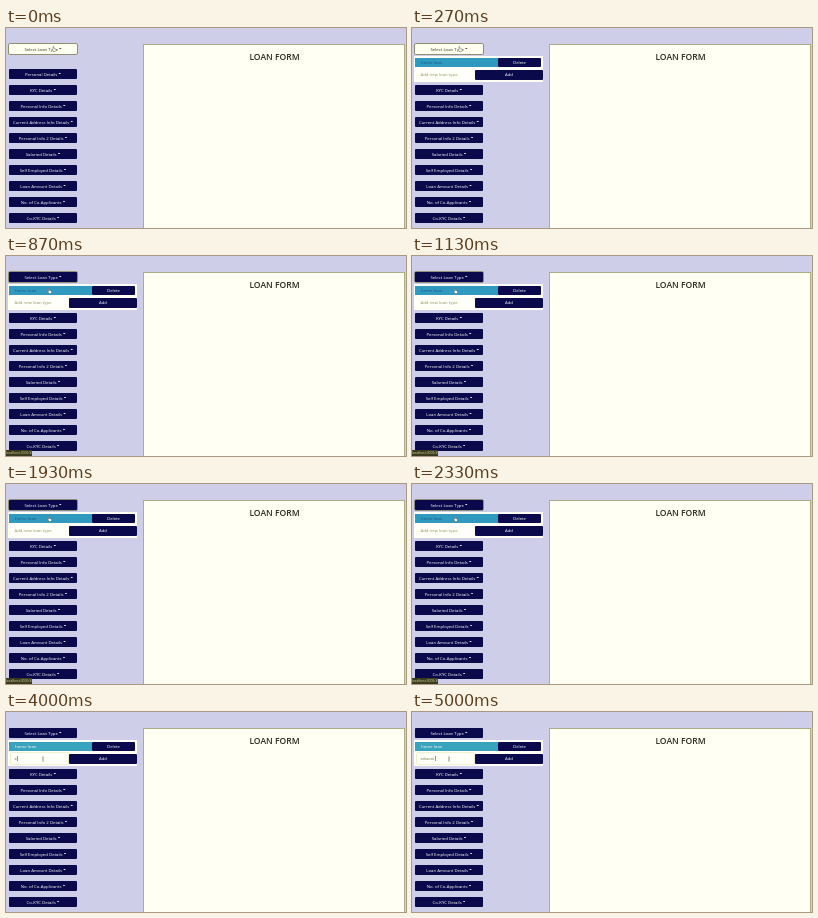
These frames come from a looping animation (400x200 px, 5.07 s). An HTML page:

```html
<!DOCTYPE html>
<html lang="en">
<head>
<meta charset="utf-8">
<title>Loan form</title>
<style>
  html, body { margin: 0; width: 100%; height: 100%; overflow: hidden; }
  body { position: relative; background: #cecee9; font: 500 4.3px "Open Sans", "Noto Sans", sans-serif; }
  #stage { position: absolute; left: 0; top: 0; width: 400px; height: 200px; overflow: hidden; }
  #stage div, #stage svg { position: absolute; box-sizing: border-box; white-space: nowrap; }
  #stage .button {
    display: flex; align-items: center; justify-content: center;
    height: 10px; padding-bottom: .8px; border-radius: 1px; background: #09094c; color: #fff;
  }
  .toggle { left: 3px; width: 68px; }
  .toggle::after {
    content: ""; width: 2.6px; height: 1.4px; margin-left: 1.1px;
    background: currentColor; clip-path: polygon(0 0, 100% 0, 50% 100%);
  }
  #panel { left: 137px; top: 16px; width: 262px; height: 184px; background: #fffff3; border: 1px solid #adad86; border-bottom: 0; }
  #title { left: 138px; top: 23px; width: 261px; text-align: center; font-size: 8.55px; line-height: 13px; font-weight: 600; color: #29291c; }
  #menu { left: 2px; top: 28px; width: 129px; height: 26px; background: #fffff5; }
  #item { left: 1px; top: 2px; width: 83px; height: 9px; padding-left: 6px; line-height: 8.4px; }
  #field { left: 3px; top: 13px; width: 57px; height: 11px; padding-left: 3.5px; line-height: 10.4px; background: #fffffa; border-radius: 1px; }
  #caret { top: 3px; width: .5px; height: 5px; background: #99996a; }
  #status { left: 0; top: 194px; width: 26px; height: 6px; line-height: 5.4px; font-size: 3.3px; background: #3c3c1c; color: #d8d8b0; }
  #beam { width: .6px; height: 5px; background: #88886a; }
</style>
</head>
<body>
<div id="stage">
  <div id="panel"></div>
  <div id="title">LOAN FORM</div>
  <div id="menu">
    <div id="item">home loan</div>
    <div class="button" style="left:84px;top:2px;width:43px;height:9px">Delete</div>
    <div id="field"><span id="value"></span><div id="caret"></div></div>
    <div class="button" style="left:61px;top:13.5px;width:68px">Add</div>
  </div>
  <div id="status">localhost:3000/#</div>
  <svg id="hand" width="5" height="6" viewBox="0 0 5 6">
    <path d="M1 .5h.8v2l2.2.5v1.5L3.4 5.6H1.6L.3 3.6l.7-.3z" fill="#fff" stroke="#44443a" stroke-width=".4"/>
  </svg>
  <div id="beam"></div>
</div>
<script>
const LOOP = 5070;
const OPEN = 200, LEAVE = 2600, FOCUS = 3270;
const KEYS = [3470, 4130, 4330, 4530, 4730, 4930];
const WORD = "educat";
const LABELS = ["Personal Details", "KYC Details", "Personal Info Details",
  "Current Address Info Details", "Personal Info 2 Details", "Salaried Details",
  "Self Employed Details", "Loan Amount Details", "No. of Co-Applicants", "Co-KYC Details"];

// Pointer path: time, x, y; it eases from each stop to the next.
const PATH = [[400, 46, 18], [530, 41.5, 32], [LEAVE, 41.5, 32],
  [2800, 8.5, 44], [3000, 8.5, 44], [FOCUS, 36.5, 44.5]];

const $ = id => document.getElementById(id);
const stage = $("stage");

function addToggle(label, top) {
  const el = document.createElement("div");
  el.className = "button toggle";
  el.textContent = label;
  el.style.top = top + "px";
  stage.insertBefore(el, $("menu"));
  return el;
}
const select = addToggle("Select Loan Type", 16);
const toggles = LABELS.map((label, i) => addToggle(label, 41 + 16 * i));

const ramp = (t, from, to) => Math.min(1, Math.max(0, (t - from) / (to - from)));
const ease = p => p * p * (3 - 2 * p);
const mix = (a, b, p) => a + (b - a) * p;
const blend = (a, b, p) => `rgb(${a.map((v, i) => Math.round(mix(v, b[i], p)))})`;
const show = (el, on) => { el.style.visibility = on ? "visible" : "hidden"; };

function pointerAt(t) {
  let [, x, y] = PATH[0];
  for (let i = 1; i < PATH.length; i++) {
    const p = ease(ramp(t, PATH[i - 1][0], PATH[i][0]));
    x = mix(x, PATH[i][1], p);
    y = mix(y, PATH[i][2], p);
  }
  return { x, y };
}

function render(t) {
  show(toggles[0], t < OPEN);
  show($("menu"), t >= OPEN);

  // The toggle fades once the pointer leaves it, and keeps a focus ring until the field is clicked.
  const fade = ramp(t, 475, 640);
  select.style.background = blend([255, 255, 240], [9, 9, 76], fade);
  select.style.color = blend([55, 55, 40], [255, 255, 255], fade);
  const ring = 1 - ramp(t, FOCUS, FOCUS + 60);
  select.style.boxShadow = `0 0 0 .8px rgba(125,125,85,${ring})`;

  const leave = ramp(t, LEAVE, LEAVE + 130);
  $("item").style.background = blend([48, 153, 192], [56, 163, 188], leave);
  $("item").style.color = blend([24, 91, 128], [250, 252, 246], leave);

  $("status").style.opacity = ramp(t, 650, 850) * (1 - ramp(t, 2800, 3000));

  const typed = KEYS.filter(k => t >= k).length;
  $("value").textContent = typed ? WORD.slice(0, typed) : "Add new loan type";
  $("value").style.color = typed ? "#77773a" : "#96965a";
  const focused = t >= FOCUS;
  $("field").style.boxShadow = focused ? "0 0 0 .6px #e4e4ac" : "none";
  $("caret").style.opacity = focused ? 1 : 0;
  $("caret").style.left = (typed ? 3.7 + $("value").offsetWidth : 3) + "px";

  const { x, y } = pointerAt(t);
  const overField = y > 40;
  show($("hand"), !overField);
  show($("beam"), overField);
  for (const id of ["hand", "beam"]) $(id).style.transform = `translate(${x}px,${y}px)`;
}

const start = performance.now();
function frame() {
  render((performance.now() - start) % LOOP);
  requestAnimationFrame(frame);
}
frame();
</script>
</body>
</html>
```
